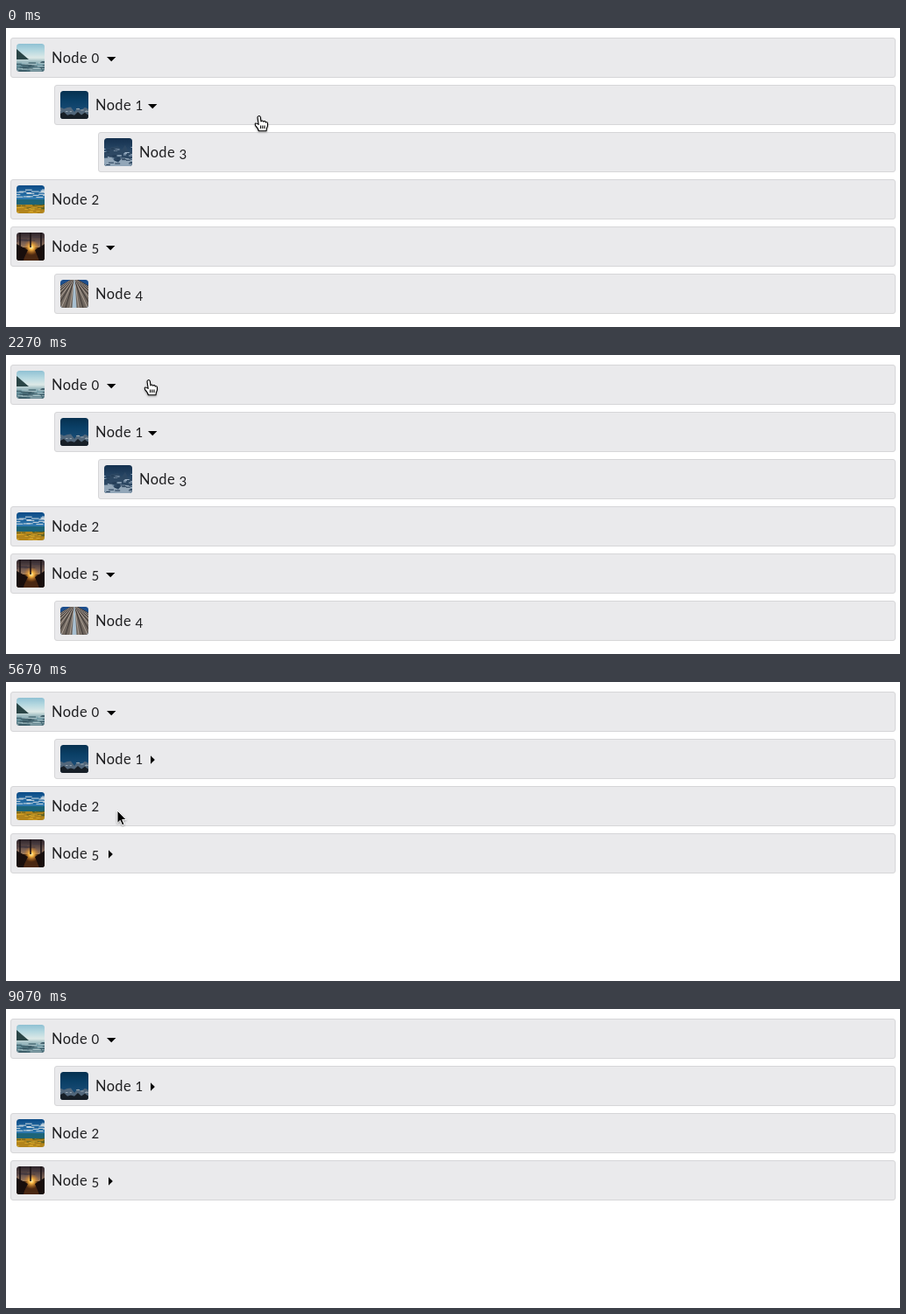
An HTML page that plays this animation: 1020 by 342 pixels, repeating every 9140 ms.

```html
<!DOCTYPE html>
<html lang="en">
<head>
<meta charset="utf-8">
<title>Nested list</title>
<style>
  html, body { margin: 0; width: 100%; height: 100%; overflow: hidden; background: #fff; }
  svg { display: block; }
  text { font: 16.4px Lato, "Open Sans", sans-serif; fill: #1f1f21; letter-spacing: .4px; }
  .figure { font-size: 15px; }
  .bar { fill: #eaeaec; stroke: #d6d6d8; }
  #cursor { filter: drop-shadow(0 1px 1px rgba(0, 0, 0, .35)); }
</style>
</head>
<body>
<svg width="1020" height="342" viewBox="0 0 1020 342">
  <defs>
    <clipPath id="round"><rect width="32" height="32" rx="3.5"/></clipPath>
    <radialGradient id="sun">
      <stop stop-color="#fff2b0"/><stop offset=".3" stop-color="#f5b443"/><stop offset="1" stop-color="#c06a1c" stop-opacity="0"/>
    </radialGradient>
  </defs>
  <g id="list"></g>
  <g id="cursor">
    <path id="arrow" d="M0 0V14.5L3.3 11.4 5.6 16.8 8 15.8 5.7 10.5H10.2Z" stroke="#fff"/>
    <path id="hand" fill="#fff" stroke="#000" stroke-width="1.1" stroke-linejoin="round"
      d="M-2 1Q0-2 1.3 1L2 6Q3.5 4 4.7 6.2 6.5 4.6 7.2 7 9.5 6 9.5 8.4V11Q8 14 8 16.8H-.6Q-1 14.5-4.4 10.7-6 6-.8 9.4ZM1.6 10.5v3.5m2.2-3.5v3.5m2.2-3.5v3.5"/>
  </g>
</svg>
<script>
const LOOP = 9140, STEPS = 137, STEP = LOOP / STEPS;
const $ = id => document.getElementById(id);
const loop = (n, f) => Array.from({ length: n }, (_, i) => f(i)).join('');

let seed = 7;
const rnd = (a, b) => a + (b - a) * ((seed = seed * 16807 % 2147483647) / 2147483647);

// Small painters for the 32 px pictures
const shape = (d, color) => `<path d="${d}" fill="${color}"/>`;
const line = (d, color, width = 1) => `<path d="${d}" fill="none" stroke="${color}" stroke-width="${width}"/>`;
const band = (y, h, color) => shape(`M0 ${y}h32v${h}H0z`, color);
const ridge = (y, amp, color) => shape(`M0 32${loop(9, i => `L${i * 4} ${y + rnd(-amp, amp)}`)}V32z`, color);
const streaks = (n, y0, y1, len, color) =>
  loop(n, () => line(`M${rnd(-len / 2, 32)} ${rnd(y0, y1)}h${rnd(len / 2, len)}`, color));
function sky(id, ...colors) {
  const stops = colors.map((c, i) => `<stop offset="${i / (colors.length - 1)}" stop-color="${c}"/>`).join('');
  return `<linearGradient id="sky${id}" x2="0" y2="1">${stops}</linearGradient>` +
    `<rect width="32" height="32" fill="url(#sky${id})"/>`;
}

const scenes = {
  0: () => sky(0, '#8fc1d3', '#b5d8e0', '#dde9e7', '#6d98a3', '#41636f') +
    shape('M0 6L14 18H0z', '#2a4546') +
    streaks(14, 20, 32, 14, '#a9c1c6') + streaks(14, 20, 32, 12, '#36545f'),
  1: () => sky(1, '#06304f', '#0a3f66', '#174a73', '#2b4257') +
    ridge(21, 3, '#52677b') + streaks(8, 20, 24, 4, '#9aa8b3') + ridge(26, 2, '#171f27'),
  3: () => sky(3, '#14304e', '#2c4b6a', '#47637d') +
    ridge(13, 6, '#2d4863') + streaks(26, 10, 28, 6, '#9bb0c4') +
    ridge(25, 3, '#92a6b8') + streaks(18, 12, 32, 6, '#213a54'),
  2: () => sky(2, '#0c4b86', '#2f7ab0', '#a9c9d8') +
    streaks(20, 5, 14, 9, '#d0dbe1') + band(16, 7, '#1d6478') + band(22, 10, '#b2841c') +
    streaks(16, 22, 27, 5, '#525d26') + streaks(16, 25, 32, 6, '#d6a62a'),
  5: () => sky(5, '#2a222a', '#6f584f', '#c39a6c', '#8a4d20') +
    streaks(8, 1, 10, 14, '#453a40') + band(17, 15, '#21130e') +
    shape('M12 17h9l5 15H8z', '#4a2812') + '<circle cx="17" cy="17" r="9" fill="url(#sun)"/>' +
    shape('M0 13L13 20 7 32H0zM32 13L21 20l5 12h6z', '#180e0c') +
    loop(3, i => line(`M${4 + i * 12} 0v17`, '#1c1316', 1.6)),
  4: () => sky(4, '#1b4d8c', '#2f6299') + shape('M0 9L13 0h6l13 9v23H0z', '#70675f') +
    loop(25, i => line(`M${12.4 + i * .3} 0L${i * 5 - 44} 32`, i % 2 ? '#ada197' : '#3d3735')) +
    shape('M15.5 0h1l2 32h-5z', '#a8bfd0')
};

// Display order; caret is its centre from the row's left edge.
const nodes = [
  { id: 0, caret: 115 },
  { id: 1, parent: 0, caret: 112 },
  { id: 3, parent: 1 },
  { id: 2 },
  { id: 5, caret: 114 },
  { id: 4, parent: 5 }
];
const byId = Object.fromEntries(nodes.map(n => [n.id, n]));
const parentOf = n => byId[n.parent];

// Click time and node
const clicks = [[600, 1], [1200, 0], [2200, 0], [3330, 1], [4400, 5]];

// Time and pointer tip
const path = [
  [0, 289, 101], [600, 170, 89], [1200, 122, 30], [1600, 135, 67],
  [1970, 158, 1], [2268, 163, 29], [2800, 166, 45], [3330, 166, 92],
  [3668, 155, 112], [4400, 123, 200], [4800, 123, 200], [5200, 145, 165],
  [6670, 71, 91], [7900, 262, 100], [8400, 66, 130], [LOOP, 66, 130]
];
const HIDE = 8730;

for (const n of nodes) {
  const depth = n.depth = parentOf(n) ? parentOf(n).depth + 1 : 0;
  const g = document.createElementNS('http://www.w3.org/2000/svg', 'g');
  n.x = 5 + 50 * depth;
  g.innerHTML =
    `<rect class="bar" x=".5" y=".5" width="${1009 - 50 * depth}" height="45" rx="2.5"/>` +
    `<g transform="translate(7 7)" clip-path="url(#round)">${scenes[n.id]()}</g>` +
    // old-style figures: 3 and up hang below the line
    `<text x="47" y="29">Node <tspan class="figure" dy="${n.id < 3 ? 0 : 1.5}">${n.id}</tspan></text>` +
    (n.caret ? '<path class="caret"/>' : '');
  n.el = $('list').appendChild(g);
  n.mark = g.querySelector('.caret');
}

// Opening a node also opens its children.
function closedAt(t) {
  const closed = new Set();
  for (const [time, id] of clicks) {
    if (time > t) break;
    if (!closed.delete(id)) closed.add(id);
    else nodes.forEach(n => n.parent === id && closed.delete(n.id));
  }
  return closed;
}

function layout(closed) {
  let y = 11;
  for (const n of nodes) {
    const up = parentOf(n);
    n.shown = !up || (up.shown && !closed.has(up.id));
    n.el.style.display = n.shown ? '' : 'none';
    if (!n.shown) continue;
    n.y = y;
    y += 54;
    n.el.setAttribute('transform', `translate(${n.x} ${n.y})`);
    if (n.mark) n.mark.setAttribute('d', closed.has(n.id)
      ? `M${n.caret - 2} 19.2v9.6l4.8-4.8z`
      : `M${n.caret - 5} 22h10.4l-5.2 5.2z`);
  }
}

function pointer(t) {
  const i = path.findIndex(p => p[0] > t);
  const [t0, ...a] = path[i - 1], [t1, ...b] = path[i];
  const u = (t - t0) / (t1 - t0), k = u * u * (3 - 2 * u);
  return a.map((v, j) => Math.round(v + (b[j] - v) * k));
}

function draw(t) {
  layout(closedAt(t));
  const [x, y] = pointer(t);
  const over = nodes.some(n => n.caret && n.shown && x >= n.x && y >= n.y && y < n.y + 46);
  $('cursor').style.display = t < HIDE ? '' : 'none';
  $('cursor').setAttribute('transform', `translate(${x} ${y})`);
  $('hand').style.display = over ? '' : 'none';
  $('arrow').style.display = over ? 'none' : '';
}

const start = performance.now();
let last = -1;
function tick() {
  const step = Math.floor((performance.now() - start + 4) / STEP) % STEPS;
  if (step !== last) draw((last = step) * STEP);
  requestAnimationFrame(tick);
}
tick();
</script>
</body>
</html>
```
